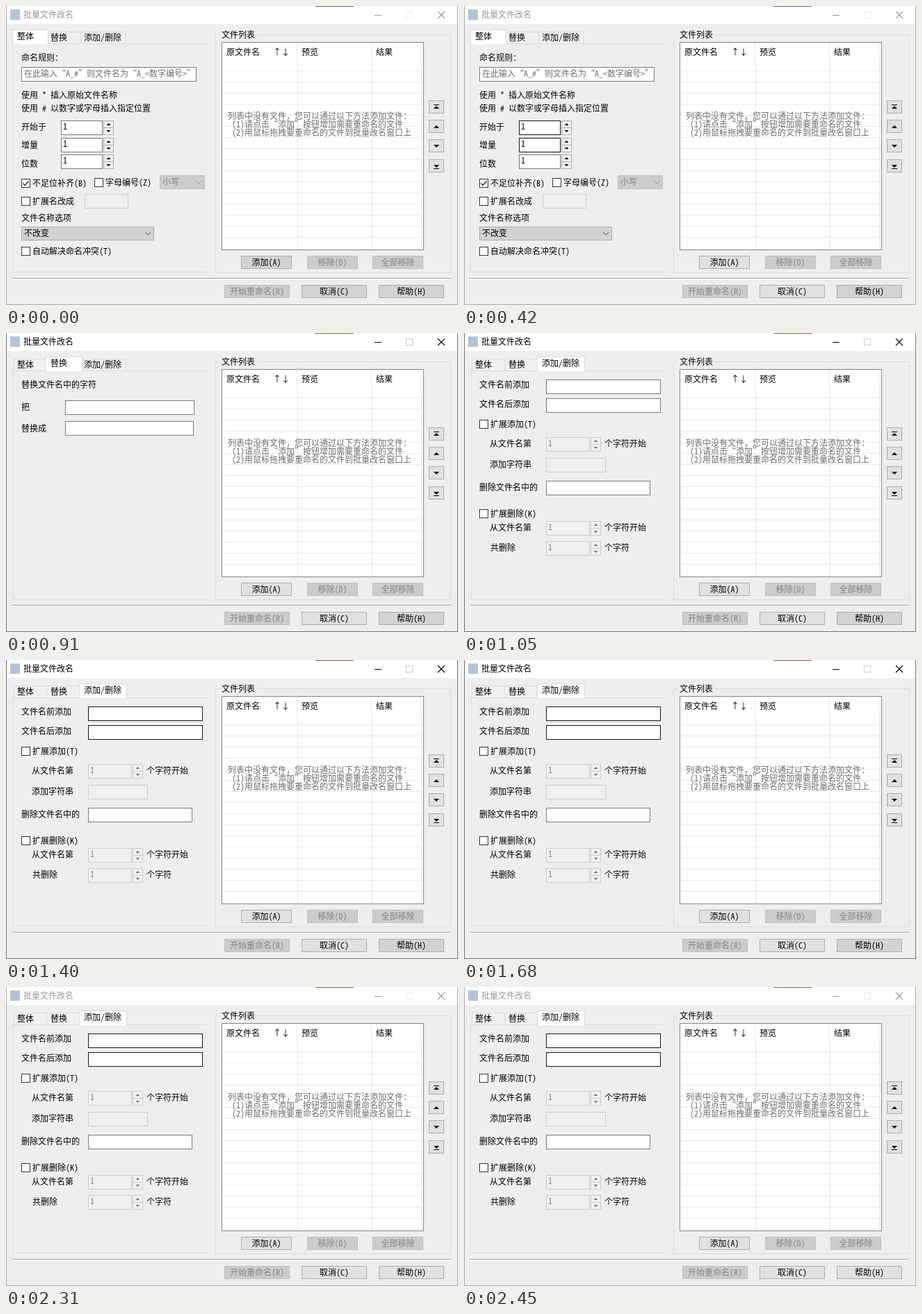
Recreate the animation shown at these times as an HTML page with a canvas. Size 650 by 431 pixels, loop 2.52 s.

```html
<!DOCTYPE html>
<html lang="zh-CN">
<head>
<meta charset="utf-8">
<title>批量文件改名</title>
<style>
html, body { margin: 0; width: 100%; height: 100%; overflow: hidden; background: #eee; }
canvas { display: block; }
</style>
</head>
<body>
<canvas id="stage" width="650" height="431" lang="zh-CN"></canvas>
<script>
const LOOP = 2520;
const EDGE = '#7a7a7a', HOVER = '#171717', PALE = '#ccc', FACE = '#e1e1e1', DARK_FACE = '#d3d3d3', DIM = '#838383';
const c = document.getElementById('stage').getContext('2d');
const FONT = '12px "Noto Sans Mono CJK SC", "Noto Sans CJK SC", "Noto Sans CJK", monospace';

function fill(x, y, w, h, color) {
  c.fillStyle = color;
  c.fillRect(x, y, w, h);
}

// Filled box with a one pixel border; right and bottom are exclusive.
function box(left, top, right, bottom, face, edge) {
  fill(left, top, right - left, bottom - top, edge);
  fill(left + 1, top + 1, right - left - 2, bottom - top - 2, face);
}

function line(color, width, ...p) {
  c.strokeStyle = color;
  c.lineWidth = width;
  c.beginPath();
  for (let i = 0; i < p.length; i += 2) c.lineTo(p[i], p[i + 1]);
  c.stroke();
}

// y is the middle of the glyphs.
function text(s, x, y, color = '#000', align = 'left') {
  c.fillStyle = color;
  c.textAlign = align;
  c.fillText(s, x, y + 4);
}

function arrow(x, y, dir, color = '#000', size = 4) {
  c.fillStyle = color;
  c.beginPath();
  c.moveTo(x - size, y + dir * size / 2);
  c.lineTo(x + size, y + dir * size / 2);
  c.lineTo(x, y - dir * size / 2);
  c.fill();
}

function field(left, top, right, touched = false) {
  box(left, top, right, top + 21, '#fff', touched ? HOVER : EDGE);
}

function disabledField(left, top, right) {
  box(left, top, right, top + 21, '#f0f0f0', PALE);
}

function spinner(left, top, right, enabled, touched) {
  const ink = enabled ? '#000' : DIM;
  if (enabled) field(left, top, right, touched);
  else disabledField(left, top, right);
  text('1', left + 3, top + 9, ink);
  for (const [y, dir] of [[top, 1], [top + 10, -1]]) {
    box(right + 1, y, right + 16, y + 11, '#f0f0f0', enabled ? '#adadad' : PALE);
    arrow(right + 8.5, y + 5.5, dir, enabled ? '#000' : '#777', 3);
  }
}

function check(x, y, label, on) {
  box(x, y, x + 13, y + 13, '#fff', '#333');
  if (on) line('#222', 1.3, x + 2.5, y + 6.5, x + 5, y + 9.5, x + 10.5, y + 3.5);
  text(label, x + 16, y + 7);
}

function combo(left, top, right, label, enabled) {
  box(left, top, right, top + 20, enabled ? DARK_FACE : PALE, enabled ? '#adadad' : '#bfbfbf');
  text(label, left + 4, top + 10, enabled ? '#000' : DIM);
  line(enabled ? '#444' : '#999', 1, right - 13, top + 8, right - 9, top + 12, right - 5, top + 8);
}

const BUTTON = {
  disabled: [PALE, '#bfbfbf', DIM],
  dark: [DARK_FACE, '#adadad', '#000'],
  light: [FACE, '#adadad', '#000'],
  hovered: ['#e5f1fb', '#0078d7', '#000'],
};

function button(left, top, width, label, look) {
  const [face, edge, ink] = BUTTON[look];
  box(left, top, left + width, top + 19, face, edge);
  text(label, left + width / 2, top + 10, ink, 'center');
}

function titleBar(active) {
  const ink = active ? '#000' : '#999';
  fill(0, 0, 650, 26, '#fff');
  fill(445, 0, 55, 1, '#8a6a3c');
  fill(6, 5, 14, 15, '#b4c4d6');
  text('批量文件改名', 25, 13, ink);
  line(ink, 1, 530, 13.5, 540, 13.5);
  c.strokeStyle = active ? PALE : '#eee';
  c.strokeRect(575.5, 8.5, 9, 9);
  line(ink, 1.1, 621, 8, 631, 18);
  line(ink, 1.1, 631, 8, 621, 18);
}

function tabs(selected, hovered) {
  const rims = [11, 58, 107, 171], names = ['整体', '替换', '添加/删除'], at = [16, 64, 112];
  const draw = i => {
    const on = i === selected;
    const left = rims[i] - 2 * on, right = rims[i + 1] + (on ? 3 : 1);
    box(left, on ? 34 : 37, right, 55, on ? '#fff' : i === hovered ? '#d8eaf9' : '#f0f0f0', '#d9d9d9');
    if (on) fill(left + 1, 53, right - left - 2, 2, '#fff');
    text(names[i], at[i], on ? 44 : 46);
  };
  fill(9, 54, 281, 1, '#dcdcdc');
  fill(9, 54, 1, 330, '#dcdcdc');
  fill(9, 383, 281, 1, '#dcdcdc');
  for (const i of [0, 1, 2]) if (i !== selected) draw(i);
  draw(selected);
}

// Fields keep their dark rim once the pointer has crossed them.
function wholePage(t) {
  text('命名规则：', 22, 75);
  field(22, 88, 274, t >= 560);
  text('在此输入“A_#”则文件名为“A_<数字编号>”', 26, 98, '#6d6d6d');
  text('使用 * 插入原始文件名称', 22, 129);
  text('使用 # 以数字或字母插入指定位置', 22, 148);
  text('开始于', 22, 175);
  text('增量', 22, 201);
  text('位数', 22, 228);
  spinner(79, 165, 139, true, t >= 420);
  spinner(79, 190, 139, true, t >= 350);
  spinner(79, 214, 139, true);
  check(22, 249, '不足位补齐(B)', true);
  check(127, 248, '字母编号(Z)');
  combo(221, 244, 286, '小写', false);
  check(22, 275, '扩展名改成');
  disabledField(113, 271, 176);
  text('文件名称选项', 22, 306);
  combo(22, 318, 213, '不改变', true);
  check(22, 347, '自动解决命名冲突(T)');
}

function replacePage() {
  text('替换文件名中的字符', 22, 75);
  text('把', 22, 107);
  text('替换成', 22, 138);
  field(85, 97, 271);
  field(85, 127, 270);
}

function addPage(t) {
  text('文件名前添加', 22, 75);
  text('文件名后添加', 22, 103);
  field(118, 67, 283, t >= 1190);
  field(118, 94, 283, t >= 1400);
  check(22, 125, '扩展添加(T)');
  text('从文件名第', 37, 160);
  spinner(118, 150, 181, false);
  text('个字符开始', 202, 160);
  text('添加字符串', 37, 190);
  disabledField(118, 180, 204);
  text('删除文件名中的', 22, 223);
  field(118, 213, 268);
  check(22, 254, '扩展删除(K)');
  text('从文件名第', 37, 281);
  spinner(118, 271, 181, false);
  text('个字符开始', 202, 281);
  text('共删除', 38, 310);
  spinner(118, 300, 181, false);
  text('个字符', 202, 310);
}

function fileList(t) {
  box(301, 41, 640, 385, '#eee', '#dcdcdc');
  fill(307, 40, 54, 3, '#eee');
  text('文件列表', 310, 42);
  box(310, 52, 601, 352, '#fff', '#828790');
  for (let y = 93; y < 351; y += 16) fill(311, y, 287, 1, '#ececec');
  for (const x of [419, 526, 597]) {
    fill(x - 1, 53, 1, 25, '#e9e9e9');
    fill(x, 78, 1, 273, '#e9e9e9');
  }
  text('原文件名', 317, 67);
  text('↑↓', 384, 67);
  text('预览', 425, 67);
  text('结果', 532, 67);
  text('列表中没有文件，您可以通过以下方法添加文件：', 319, 159, '#6d6d6d');
  text('(1)请点击“添加”按钮增加需要重命名的文件', 325, 171, '#6d6d6d');
  text('(2)用鼠标拖拽要重命名的文件到批量改名窗口上', 325, 183, '#6d6d6d');
  [136, 164, 192, 221].forEach((y, i) => {
    box(608, y, 630, y + 19, FACE, '#adadad');
    arrow(619, y + 10, i < 2 ? 1 : -1);
    if (i === 0) fill(615, y + 6, 8, 1, '#000');
    if (i === 3) fill(615, y + 13, 8, 1, '#000');
  });
  button(338, 360, 73, '添加(A)', t < 210 ? 'dark' : 'light');
  button(433, 360, 73, '移除(D)', 'disabled');
  button(527, 360, 73, '全部移除', 'disabled');
}

function draw(t) {
  const within = (from, to) => t >= from && t < to;
  const active = within(910, 2310);
  const page = t < 910 ? 0 : t < 1050 ? 1 : 2;
  const hoveredTab = within(770, 910) ? 1 : within(980, 1050) ? 2 : -1;

  c.font = FONT;
  fill(0, 0, 650, 431, '#eee');
  titleBar(active);
  tabs(page, hoveredTab);
  [wholePage, replacePage, addPage][page](t);
  fileList(t);
  fill(9, 392, 631, 1, '#a0a0a0');
  fill(9, 393, 631, 1, '#fff');
  button(314, 402, 94, '开始重命名(R)', 'disabled');
  button(425, 402, 94, '取消(C)', t < 210 ? 'dark' : 'light');
  button(536, 402, 94, '帮助(H)', t < 2100 ? 'dark' : t < 2240 ? 'hovered' : 'light');
  line(active ? '#707070' : '#aaa', 1, 0.5, 0, 0.5, 430.5, 649.5, 430.5, 649.5, 0);
}

const start = performance.now();
function tick() {
  draw((performance.now() - start) % LOOP);
  requestAnimationFrame(tick);
}
tick();
</script>
</body>
</html>
```
